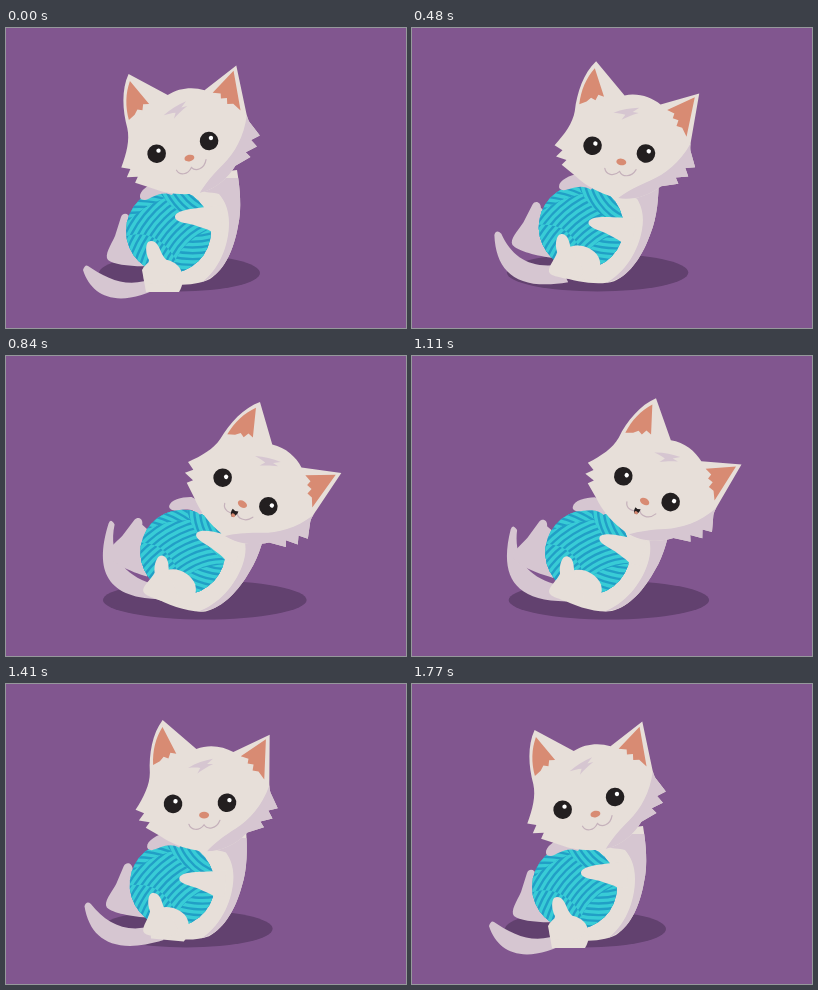
These frames come from a looping animation (400 by 300 pixels, 1800 ms). An HTML page:

```html
<!DOCTYPE html>
<html lang="en">
<head>
<meta charset="utf-8">
<title>Kitten with yarn</title>
<style>
  html, body { margin: 0; width: 100%; height: 100%; overflow: hidden; background: #81568f; }
  svg { display: block; width: 100vw; height: 100vh; }
  .light { fill: #e7dfd9; }
  .shade { fill: #d6c6d1; }
  .pink { fill: #d88b73; }
  .dark { fill: #231f20; }
  .line { fill: none; stroke: #c5b1bb; stroke-width: 1.2; stroke-linecap: round; }
</style>
</head>
<body>
<svg viewBox="0 0 400 300">
  <defs>
    <clipPath id="ballClip"><circle r="42.5"/></clipPath>
    <clipPath id="headClip"><use href="#skull"/></clipPath>
    <clipPath id="bodyClip"><use href="#torso"/></clipPath>
  </defs>
  <ellipse id="shadow" fill="#62416f"/>
  <path id="tail" class="shade"/>

  <g id="body">
    <path id="leg" class="shade" d="M115 189 C117 184 123 185 124 191 L146 200 V238 C128 239 108 237 102 232 C98 227 105 217 109 208Z"/>
    <path id="torso" class="light" d="M160 150 L231 142 C234 160 236 181 232 198 C228 221 219 241 204 251 C190 258 166 258 150 255 C140 252 138 240 145 224Z"/>
    <g clip-path="url(#bodyClip)">
      <path class="shade" d="M176 150 H245 V225 L184 262 C211 249 223 220 223 195 C223 182 219 173 213 166 C205 164 194 164 184 162Z"/>
    </g>
    <g id="ball" transform="translate(162.5 203)" clip-path="url(#ballClip)"></g>
    <path id="arm" class="light" d="M207 178 L192 180 C183 181 169 183 169 189 C169 194 180 195 188 197 C196 200 202 201 206 204 L216 203 L215 177Z"/>
    <path id="thigh" class="light" d="M148 232 C156 217 176 219 185 229 C190 236 190 246 185 254 L152 254Z"/>
    <path class="light" d="M138 252 C137 246 142 240 143 232 C139 224 139 213 145 213 C151 213 153 219 156 226 C160 234 169 238 173 248 C170 256 158 257 150 256 C143 256 139 255 138 252Z"/>
    <path id="paw" class="shade" d="M134 169 C133 163 143 156 152 153 L172 156 L166 167 C155 162 146 170 139 172 C136 172 134 171 134 169Z"/>
  </g>

  <g id="head">
    <path id="skull" class="light" d="M131 43 L169 66 C181 59 195 59 206 63 L239 40 L246 84 C247 91 248 95 250 98 L259 111 L250 115 L255.5 122 L244 127 L248.5 132 L233 140 C222 156 206 166 187 166 C171 166 159 163 148 158 L132 152 L135 146 L124 146 L128 138 L119 136 C125 122 129 109 127 97 C123 79 123 58 131 43Z"/>
    <g clip-path="url(#headClip)">
      <path class="shade" d="M247 90 C243 112 233 127 221 138 C211 147 203 155 195 167 H240 L270 130 L262 90Z"/>
    </g>
    <path class="pink" d="M132 50 L150 74 L144 74 L143 80 L138 79 L135 84 L129 89 C126 75 127 62 132 50Z"/>
    <path class="pink" d="M236 45 L214 66 L222 67 L222 72 L228 72 L228 78 L234 78 L241 85Z"/>
    <path class="shade" d="M164 86 C171 80 179 76 187 73 L182 79 L188 78 C182 82 178 86 174 90 L176 84 C172 84 168 85 164 86Z"/>
    <g class="dark"><circle cx="155" cy="124" r="9.3"/><circle cx="208" cy="114" r="9.3"/></g>
    <g fill="#fff"><circle cx="157" cy="121" r="2.2"/><circle cx="210" cy="111" r="2.2"/></g>
    <ellipse class="pink" cx="187.5" cy="130" rx="5" ry="3.3" transform="rotate(-10 187.5 130)"/>
    <path class="line" d="M174 141.5 C177 147 185 147 189 139.5 C193 144 202 142 204 132.5"/>
    <g id="mouth">
      <path class="dark" d="M-4.5 -3 Q0 -1 4.5 -4 C6 2 3 7 0 7 C-3 6 -5 2 -4.5 -3Z"/>
      <ellipse class="pink" cx="1" cy="4.5" rx="3" ry="2.5"/>
    </g>
  </g>
</svg>
<script>
const LOOP = 1800, STEP = 30;
const get = id => document.getElementById(id);
const set = (id, attrs) => {
  for (const k in attrs) get(id).setAttribute(k, attrs[k]);
};
const move = (id, x, y) => set(id, { transform: `translate(${x} ${y})` });
const mix = (a, b, p) => a + (b - a) * p;
const clamp = x => Math.min(1, Math.max(0, x));

// Yarn: each patch is wound with concentric strands around a far centre.
const patches = [
  ["M-45-45H45V45H-45Z", 62, 54],
  ["M-44-6C-26-26-4-34 20-40L-10-50H-50Z", -30, 58],
  ["M-14-48C-4-26 16-12 46-6V-48Z", 52, -64],
  ["M-46 6C-22-2 0 6 16 46H-46Z", 62, 60],
  ["M2 46C6 22 18 8 46-4V46Z", 24, -60]
];
const winding = ([d, x, y], i) => {
  let strands = "";
  for (let r = 4; r < 150; r += 5.8)
    strands += `<circle cx="${x}" cy="${y}" r="${r}"/>`;
  return `<clipPath id="wind${i}"><path d="${d}"/></clipPath>
    <g clip-path="url(#wind${i})"><path d="${d}" fill="#219fc6"/>
    <g fill="none" stroke="#38ccd6" stroke-width="3.4">${strands}</g></g>`;
};
get("ball").innerHTML = patches.map(winding).join("");

// Tail outline when upright, halfway and leaning back: outer edge, then inner edge.
const tails = [
  [77,242, 86,270, 114,282, 160,256, 150,248, 126,262, 102,252, 82,238],
  [83,205, 84,242, 104,262, 156,254, 148,236, 118,240, 100,228, 90,204],
  [103,167, 90,208, 95,242, 154,243, 146,228, 118,218, 102,200, 109,168]
];
const tailPath = p => {
  const a = (1 - p) * (1 - 2 * p), b = 4 * p * (1 - p), c = p * (2 * p - 1);
  const v = tails[0].map((n, i) => n * a + tails[1][i] * b + tails[2][i] * c);
  const [x, y] = v;
  return `M${x} ${y}C${v.slice(2, 8)}L${v.slice(8, 10)}C${v.slice(10)}Q${x + 2} ${y - 6} ${x} ${y}Z`;
};

const lean = t => {
  const u = clamp((Math.min(t, LOOP + 10 - t) - 18) / 940);
  return u < 0.5 ? 4 * u ** 3 : 1 - 4 * (1 - u) ** 3;
};

function draw(t) {
  const p = lean(t);
  const sink = 1 - clamp(2 * p);
  set("shadow", { cx: mix(173.5, 199, p), cy: mix(245, 244, p), rx: mix(80.5, 102, p), ry: mix(18.5, 19.5, p) });
  set("tail", { d: tailPath(p) });
  set("body", { transform: `translate(${-3 * p} ${-2 * p}) rotate(${20 * p} 185 250)` });
  move("leg", -9 * p, 0);
  move("arm", 0, 48 * p * (1 - p) - 8 * p);
  move("thigh", -12 * sink, 10 * sink);
  move("paw", 0, -5 * p);
  set("head", {
    transform: `translate(${185 + 37.5 * p} ${151.5 + 13 * p * p}) rotate(${46 * p - 2.9}) translate(-188 -151.5)`
  });
  const open = 0.7 * clamp((p - 0.7) / 0.25);
  set("mouth", { transform: `translate(187 141.5) rotate(-10) scale(${open})` });
}

const start = performance.now();
function tick() {
  const t = (performance.now() - start) % LOOP;
  draw(Math.floor(t / STEP) * STEP);
  requestAnimationFrame(tick);
}
draw(0);
requestAnimationFrame(tick);
</script>
</body>
</html>
```
